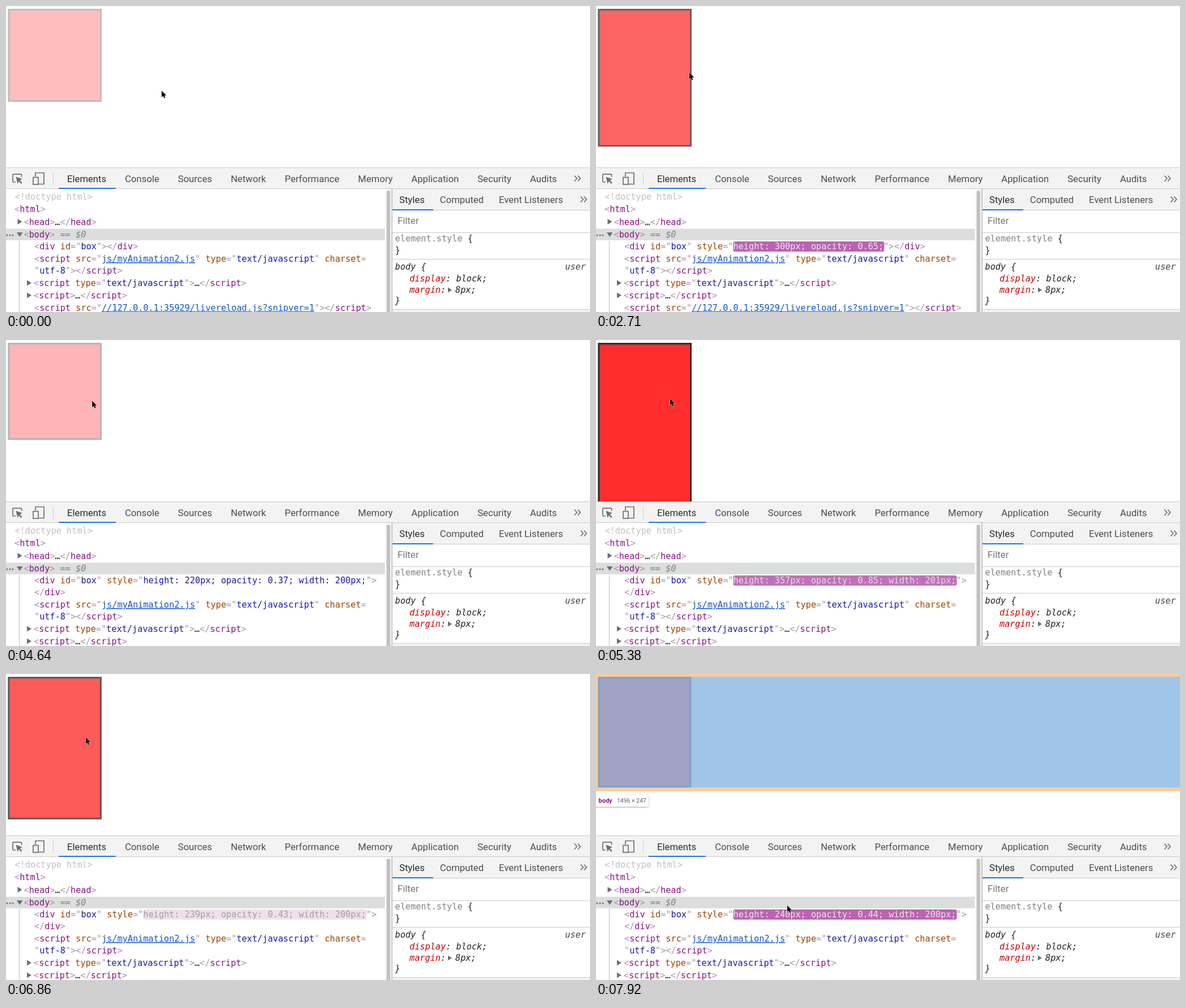
An HTML page that plays this animation: 1032 px wide and 542 px high, repeating every 8000 ms.

```html
<!DOCTYPE html>
<html lang="en">
<head>
<meta charset="utf-8">
<title>Hover animation in the inspector</title>
<style>
html, body { margin: 0; width: 100%; height: 100%; overflow: hidden; background: #fff; }
svg { display: block; width: 1032px; height: 542px; }
text { white-space: pre; }
.ui { font: 16.7px Roboto, sans-serif; fill: #4a4d51; }
.ui .on { fill: #2b2b2b; }
.ui .hint { fill: #757575; }
.code { font: 15.23px "DejaVu Sans Mono", monospace; fill: #222; }
.p { fill: #a894a6; }
.t { fill: #881280; }
.a { fill: #994500; }
.v { fill: #1a1aa6; }
.l { fill: #1155cc; text-decoration: underline; }
.g { fill: #c0c0c0; }
.s { fill: #808080; }
.e { fill: #808080; font-style: italic; }
.u { fill: #444; font-style: italic; }
.n { fill: #c80000; font-style: italic; }
.i { font-style: italic; }
.arrow { fill: #6e6e6e; }
.icon { fill: none; stroke: #6e6e6e; stroke-width: 1.7; }
</style>
</head>
<body>
<svg viewBox="0 0 1032 542">
  <defs>
    <clipPath id="page"><rect width="1032" height="286"/></clipPath>
    <filter id="shadow" x="-10%" y="-40%" width="120%" height="200%">
      <feDropShadow dx="0" dy="1" stdDeviation="1.5" flood-opacity=".35"/>
    </filter>
  </defs>
  <rect width="1032" height="542" fill="#fff"/>

  <g clip-path="url(#page)">
    <g id="box">
      <rect id="fill" x="3.5" y="5" fill="#f00"/>
      <rect id="border" x="5" y="6.5" fill="none" stroke="#000" stroke-width="3"/>
    </g>
    <g id="overlay">
      <path id="margin" fill="#f6b26b" fill-opacity=".66" fill-rule="evenodd"/>
      <rect id="content" x="3.5" y="5" width="1100" fill="#6fa8dc" fill-opacity=".66"/>
      <g id="tip" font-family="Roboto, sans-serif">
        <path d="M-4 6H6L12 0L18 6H90Q93 6 93 9V24Q93 27 90 27H-4Z" fill="#fff" filter="url(#shadow)"/>
        <text x="4.5" y="20" font-size="11" font-weight="700" fill="#881280">body</text>
        <text id="size" x="37" y="20" font-size="10.4" fill="#5f6368"></text>
      </g>
    </g>
  </g>

  <!-- Toolbar -->
  <rect y="286" width="1032" height="38" fill="#f3f3f3"/>
  <path d="M0 286.5H1032M0 323.5H1032" stroke="#c9c9c9"/>
  <path d="M83.5 295V317" stroke="#ccc"/>
  <rect x="93" y="322" width="101" height="2" fill="#1a73e8"/>
  <g class="icon">
    <path d="M17 312H13.5Q11.9 312 11.9 310.4V299.4Q11.9 297.8 13.5 297.8H26Q27.6 297.8 27.6 299.4V302.5"/>
    <path d="M52 302V295.5H67V315.5H58"/>
    <rect x="48" y="303.5" width="9" height="12.5"/>
  </g>
  <path class="arrow" d="M17.5 302.5L29 306.8L24.6 308.8L28.6 313.2L26.8 315L22.6 310.6L20.6 315Z"/>
  <path id="more" class="icon" d="M1004.5 300.5l4.5 5l-4.5 5m6 -10l4.5 5l-4.5 5"/>

  <!-- Element tree -->
  <rect y="394.5" width="670" height="20.5" fill="#dbdedc"/>
  <path d="M23.5 416V542" stroke="#a9bfe6"/>
  <path d="M2 406h.01m5 0h.01m5 0h.01" stroke="#6e6e6e" stroke-width="3" stroke-linecap="round"/>
  <path class="arrow" d="M20.5 377l8 5l-8 5ZM19 401h10.5l-5.3 8Z"/>
  <rect id="glow" x="242.5" y="417" height="18" rx="3" fill="#bc62b3"/>
  <g id="tree" class="code"></g>
  <g id="tail" class="code">
    <path class="arrow" d="M37 485.5l8 5l-8 5ZM37 507.5l8 5l-8 5Z"/>
  </g>

  <!-- Sidebar -->
  <rect x="669.5" y="324" width="12" height="218" fill="#fafafa"/>
  <rect x="672.5" y="327" width="6.5" height="225" rx="3.2" fill="#c1c1c1"/>
  <rect x="682" y="324" width="350" height="38" fill="#f3f3f3"/>
  <rect x="682" y="538" width="350" height="4" fill="#f3f3f3"/>
  <path d="M682 361.5h350m-350 40h350m-350 47h350m-350 89h350" stroke="#c9c9c9"/>
  <path d="M682 324V542" stroke="#b5b5b5" stroke-width="1.5"/>
  <rect x="683" y="360" width="72" height="2" fill="#1a73e8"/>
  <use href="#more" x="11" y="37"/>
  <path class="arrow" d="M781 498.5l7 4.5l-7 4.5Z"/>
  <g id="labels" class="ui"></g>
  <g id="styles" class="code"></g>

  <path id="cursor" d="M0 0V11.6L2.7 9.2L4.5 13.2L6.4 12.3L4.7 8.5H8.3Z" stroke="#fff" paint-order="stroke"/>
</svg>

<script>
const LOOP = 8000, STEP = 143, HALF_LIFE = 330, FADE = 560;
const SCALE = 0.792, CHAR = 9.17, ROW = 21;
const $ = id => document.getElementById(id);
const set = (el, attrs) => Object.entries(attrs).forEach(([k, v]) => el.setAttribute(k, v));
const show = (el, on) => el.style.display = on ? "" : "none";
const mix = (a, b, k) => a + (b - a) * k;
const clamp = k => Math.min(1, Math.max(0, k));

function make(name, parent, attrs) {
  const el = document.createElementNS("http://www.w3.org/2000/svg", name);
  set(el, attrs);
  return parent.appendChild(el);
}

// Each run is a class letter followed by its text; runs are separated by "|".
function line(parent, x, y, runs) {
  const el = make("text", parent, { x, y });
  for (const run of runs.split("|"))
    make("tspan", el, { class: run[0] }).textContent = run.slice(1);
  return el;
}

function tabs(x, y, gap, names) {
  names.split(",").forEach((name, k) => {
    const el = make("text", $("labels"), { x, y, class: k ? "" : "on" });
    el.textContent = name;
    x += el.getComputedTextLength() + gap;
  });
}

tabs(108, 312, 33, "Elements,Console,Sources,Network,Performance,Memory,Application,Security,Audits");
tabs(695, 349, 27, "Styles,Computed,Event Listeners");
make("text", $("labels"), { x: 692, y: 386, class: "hint" }).textContent = "Filter";

const tree = $("tree"), tail = $("tail"), rules = $("styles");
line(tree, 15.5, 343, "g<!doctype html>");
line(tree, 15, 365, "p<|thtml|p>");
line(tree, 31.5, 387.5, "p<|thead|p>|x…|p</|thead|p>");
line(tree, 31.5, 409.5, "p<|tbody|p>|s ==|e $0");
const opening = 'p<|tdiv|p |aid|p="|vbox|p"';
const plainRow = line(tree, 50, 431, opening + "|p></|tdiv|p>");
const row = line(tree, 50, 431, opening + '|p |astyle|p="|v|p">');
const value = row.querySelector(".v:nth-last-child(2)");
const closing = line(tree, 50, 431, "p</|tdiv|p>");

line(tail, 50, 453, 'p<|tscript|p |asrc|p="|ljs/myAnimation2.js|p" |atype|p="|vtext/javascript|p" |acharset|p=');
line(tail, 50, 474, 'p"|vutf-8|p"></|tscript|p>');
line(tail, 49, 496, 'p<|tscript|p |atype|p="|vtext/javascript|p">|x…|p</|tscript|p>');
line(tail, 49, 518, "p<|tscript|p>|x…|p</|tscript|p>");
line(tail, 50, 540, 'p<|tscript|p |asrc|p="|l//127.0.0.1:35929/livereload.js?snipver=1|p"></|tscript|p>');

line(rules, 687.5, 416.5, "selement.style|x {");
line(rules, 687.5, 437.5, "x}");
line(rules, 687.5, 466.5, "ibody {");
line(rules, 988, 466.5, "uuser");
line(rules, 713, 488, "ndisplay|i: block;");
line(rules, 713, 508, "nmargin|i:");
line(rules, 794, 508, "i8px;");
line(rules, 687.5, 527, "i}");

// Spans in which the picture moves; it rests between them.
const bursts = [[750, 1670], [2420, 3310], [3750, 4790], [4940, 5670], [5970, 7010], [7160, 7920]];

// The pointer enters (grow to 400) or leaves (shrink to 200).
const goals = [[2375, 400], [3045, 200], [4600, 400], [5660, 200], [6520, 400], [7245, 200]];

// Moments at which the tree catches up with the box.
const updates = [2705, 4000, 5318, 6386, 7210, 7913];

// Pointer path: time, x, y.
const path = [[700, 275, 150], [1670, 127, 108], [2420, 128, 109], [2706, 165, 118], [3310, 285, 124],
  [3893, 302, 121], [4700, 133, 106], [5369, 131, 104], [6000, 222, 120], [6399, 200, 118],
  [6800, 140, 110], [7160, 150, 140], [7589, 293, 397], [7920, 338, 410]];

function tickAt(t) {
  const [from, to] = bursts.findLast(([from]) => from <= t) || [0, 0];
  return t >= to ? to : from + Math.floor((t - from) / STEP) * STEP;
}

function heightAt(t) {
  return goals.reduce((h, [from, goal], k) => {
    const end = Math.min(t, goals[k + 1]?.[0] ?? LOOP);
    return t > from ? goal + (h - goal) * 2 ** ((from - end) / HALF_LIFE) : h;
  }, 200);
}

function widthAt(t) {
  if (t < goals[1][0]) return null;
  return goals.findLast(([from]) => from <= t)[1] === 200 ? 200 : 201;
}

const opacityOf = height => 0.297 + 0.0035 * (height - 200);

function pointerAt(t) {
  let [start, x, y] = path[0];
  for (const [end, nextX, nextY] of path.slice(1)) {
    const part = clamp((t - start) / (end - start));
    x = mix(x, nextX, part);
    y = mix(y, nextY, part);
    start = end;
  }
  return [x, y];
}

function drawBox(t) {
  const height = heightAt(t);
  const w = ((widthAt(t) ?? 201) + 8) * SCALE;
  const h = (height + 8) * SCALE;
  set($("fill"), { width: w, height: h });
  set($("border"), { width: w - 3, height: h - 3 });
  set($("box"), { opacity: opacityOf(height) - 0.042 });

  const bottom = 5 + h;
  show($("overlay"), t > 7700);
  set($("margin"), { d: `M0 0H1032V${bottom + 6.5}H0ZM3.5 5V${bottom}H1032V5Z` });
  set($("content"), { height: h });
  set($("tip"), { transform: `translate(0 ${bottom + 7})` });
  $("size").textContent = `1496 × ${Math.round(height) + 8}`;
}

function drawTree(t) {
  const at = updates.findLast(time => time <= t) ?? -LOOP;
  const styled = at > 0, width = widthAt(at);
  show(plainRow, !styled);
  show(row, styled);
  show(closing, styled);

  const height = Math.round(heightAt(at));
  const css = `height: ${height}px; opacity: ${opacityOf(height).toFixed(2)};` + (width ? ` width: ${width}px;` : "");
  value.textContent = css;
  const rowEnd = 50 + (css.length + 23) * CHAR;
  set(closing, width ? { x: 50, y: 431 + ROW } : { x: rowEnd, y: 431 });
  set(tail, { transform: `translate(0 ${width ? ROW : 0})` });

  const heat = clamp(1 - (t - at) / FADE);
  const grey = mix(140, 232, heat), tint = clamp(heat * 7);
  value.style.fill = `rgb(${[26, 26, 166].map(c => mix(c, grey, tint))})`;
  set($("glow"), { width: css.length * CHAR + 0.8, opacity: heat });
}

const start = performance.now();
let shown = -1;
function frame() {
  const t = tickAt((performance.now() - start) % LOOP);
  if (t !== shown) {
    drawBox(t);
    drawTree(t);
    set($("cursor"), { transform: `translate(${pointerAt(t)})` });
    shown = t;
  }
  requestAnimationFrame(frame);
}
frame();
</script>
</body>
</html>
```
